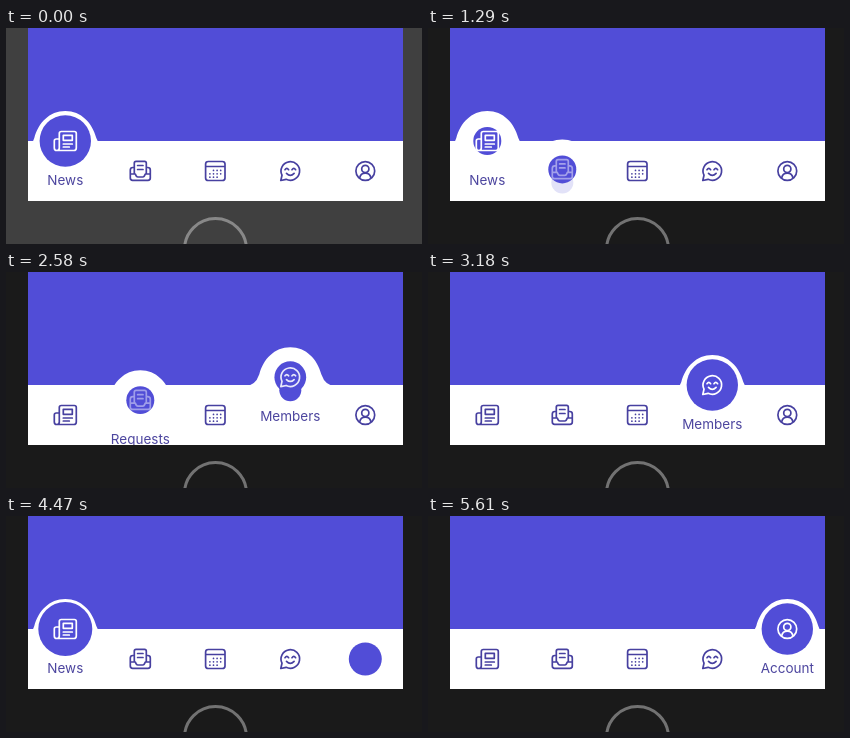
Animation, 416 px wide and 216 px high, one loop 5910 ms. Source, as an HTML page:

```html
<!DOCTYPE html>
<html lang="en">
<head>
<meta charset="utf-8">
<title>Tab bar</title>
<style>
html, body { margin: 0; width: 100%; height: 100%; overflow: hidden; background: #404040; }
svg { display: block; width: 416px; height: 216px; }
text { font: 400 13.5px Inter, "Liberation Sans", sans-serif; text-anchor: middle; fill: #4d469f; }
.icon { fill: none; stroke-width: 1.7; stroke-linecap: round; stroke-linejoin: round; }
.dark { stroke: #4740a0; }
.light { stroke: #fff; }
.dot { fill: #514dd7; }
</style>
</head>
<body>
<svg viewBox="0 0 416 216">
  <defs><clipPath id="screen"><rect x="22" width="375" height="173"/></clipPath></defs>
  <rect id="body" width="416" height="216"/>
  <circle id="home" cx="209.5" cy="221.5" r="31" fill="none" stroke-width="3"/>
  <g clip-path="url(#screen)">
    <rect class="dot" x="22" width="375" height="113"/>
    <rect x="22" y="113" width="375" height="60" fill="#fff"/>
    <g id="humps"></g>
    <g id="tabs"></g>
  </g>
</svg>
<script>
const LOOP = 5910;
const HUMP = 'M-46 9Q-35 9 -31 -3C-27 -18 -16 -30 0 -30S27 -18 31 -3Q35 9 46 9V60H-46Z';

// Calendar days: a 4 by 3 grid without its first and last cell
let days = '';
for (let i = 1; i < 11; i++) days += `M${-5.4 + (i % 4) * 3.6} ${-0.6 + Math.floor(i / 4) * 3.4}h.01`;

const TABS = [
  ['News', 'M-6 7V-7.5Q-6 -9.5 -4 -9.5H9Q11 -9.5 11 -7.5V7Q11 9.5 8.5 9.5H-8.5Q-11 9.5 -11 7V0Q-11 -2 -9 -2H-6V7Q-6 9.5 -8.5 9.5M-2 -5.7H7V-.7H-2ZM-2 3H7M-2 6H4'],
  ['Requests', 'M-6 3V-8Q-6 -9.7 -4.3 -9.7H4.3Q6 -9.7 6 -8V3M-2.7 -5.5H2.7M-2.7 -1.5H2.7M-6 -3.5H-7.5Q-10 -3.5 -10 -1V7Q-10 9.3 -7.7 9.3H7.7Q10 9.3 10 7V-1Q10 -3.5 7.5 -3.5H6M-10 3H-5Q-4 6 -2.5 6H2.5Q4 6 5 3H10'],
  ['Calendar', 'M-7 -9.5H7Q9.7 -9.5 9.7 -7V7Q9.7 9.5 7 9.5H-7Q-9.7 9.5 -9.7 7V-7Q-9.7 -9.5 -7 -9.5ZM-9.7 -4.5H9.7' + days],
  ['Members', 'M-8.3 4.2A9.3 9.3 0 1 1 -4.2 8.3L-9.5 9.5ZM-5.3 -1.3Q-3.5 -3.8 -1.7 -1.3M1.7 -1.3Q3.5 -3.8 5.3 -1.3M-3.8 2.4Q0 6.2 3.8 2.4'],
  ['Account', 'M-9.4 0A9.4 9.4 0 1 1 9.4 0A9.4 9.4 0 1 1 -9.4 0ZM-3.6 -2A3.6 3.6 0 1 1 3.6 -2A3.6 3.6 0 1 1 -3.6 -2ZM-5.6 7.2Q-5 2.2 0 2.2T5.6 7.2']
];

// hold delays the shrinking of the circle that is left
const TAPS = [
  { at: 930, from: 0, to: 1, hold: 0 },
  { at: 2040, from: 1, to: 3, hold: 0 },
  { at: 3180, from: 3, to: 0, hold: 300 },
  { at: 4380, from: 0, to: 4, hold: 0 }
];

const ramp = (t, from, to) => Math.min(1, Math.max(0, (t - from) / (to - from)));
function ease(t, from, to) {
  const u = ramp(t, from, to);
  return u * u * (3 - 2 * u);
}

// Damped swing from 1 to 0, first overshoot after half a period
function spring(t, half, damping) {
  if (t <= 0) return 1;
  const w = Math.PI / half;
  return Math.exp(-damping * t) * (Math.cos(w * t) + damping / w * Math.sin(w * t));
}

const rise = t => ({
  y: 30 * spring(t - 342, 190, 0.007) * (1 - ease(t, 560, 780)),
  r: 16.5 * ease(t, 0, 90) - 2.5 * ease(t, 90, 180) + 11.7 * ease(t, 470, 750),
  light: ramp(t, 150, 600),
  dark: 1 - ramp(t, 60, 90),
  drip: ease(t, 330, 450)
});

const fall = (t, hold) => ({
  y: 30 * ease(t, 360, 720),
  r: 25.7 + 1.3 * ease(t, 0, 90) - 13 * ease(t, 100 + hold, 300 + hold) - 14 * ease(t, 540, 700),
  light: 1 - ease(t, 360, 700),
  dark: ramp(t, 580, 700),
  drip: 0
});

function pose(index, t) {
  const tap = TAPS.filter(p => p.at <= t && (p.from === index || p.to === index)).pop();
  if (!tap) return index === 0 ? rise(LOOP) : fall(LOOP, 0);
  return tap.to === index ? rise(t - tap.at) : fall(t - tap.at, tap.hold);
}

function add(parent, tag, attrs) {
  const el = document.createElementNS('http://www.w3.org/2000/svg', tag);
  for (const name in attrs) el.setAttribute(name, attrs[name]);
  return parent.appendChild(el);
}

const byId = id => document.getElementById(id);
const body = byId('body'), home = byId('home');
const views = TABS.map(([name, d]) => {
  const hump = add(byId('humps'), 'path', { d: HUMP, fill: '#fff' });
  const tab = add(byId('tabs'), 'g', {});
  const drip = add(tab, 'circle', { class: 'dot', cy: 13, r: 11 });
  const dot = add(tab, 'circle', { class: 'dot' });
  const dark = add(tab, 'path', { class: 'icon dark', d });
  const light = add(tab, 'path', { class: 'icon light', d });
  add(tab, 'text', { y: 43.8 }).textContent = name;
  return { hump, tab, drip, dot, dark, light };
});
const gray = v => `rgb(${v},${v},${v})`;

function render(t) {
  const dim = ramp(t, 830, 960);
  body.setAttribute('fill', gray(64 - 38 * dim));
  home.setAttribute('stroke', gray(136 - 22 * dim));
  views.forEach((v, i) => {
    const p = pose(i, t);
    const place = `translate(${59.3 + 75 * i} ${113 + p.y})`;
    v.hump.setAttribute('transform', place);
    v.tab.setAttribute('transform', place);
    v.dot.setAttribute('r', Math.max(0, p.r));
    for (const part of ['drip', 'dark', 'light']) v[part].setAttribute('opacity', p[part]);
  });
}

const start = performance.now();
function tick() {
  render((performance.now() - start) % LOOP);
  requestAnimationFrame(tick);
}
tick();
</script>
</body>
</html>
```
